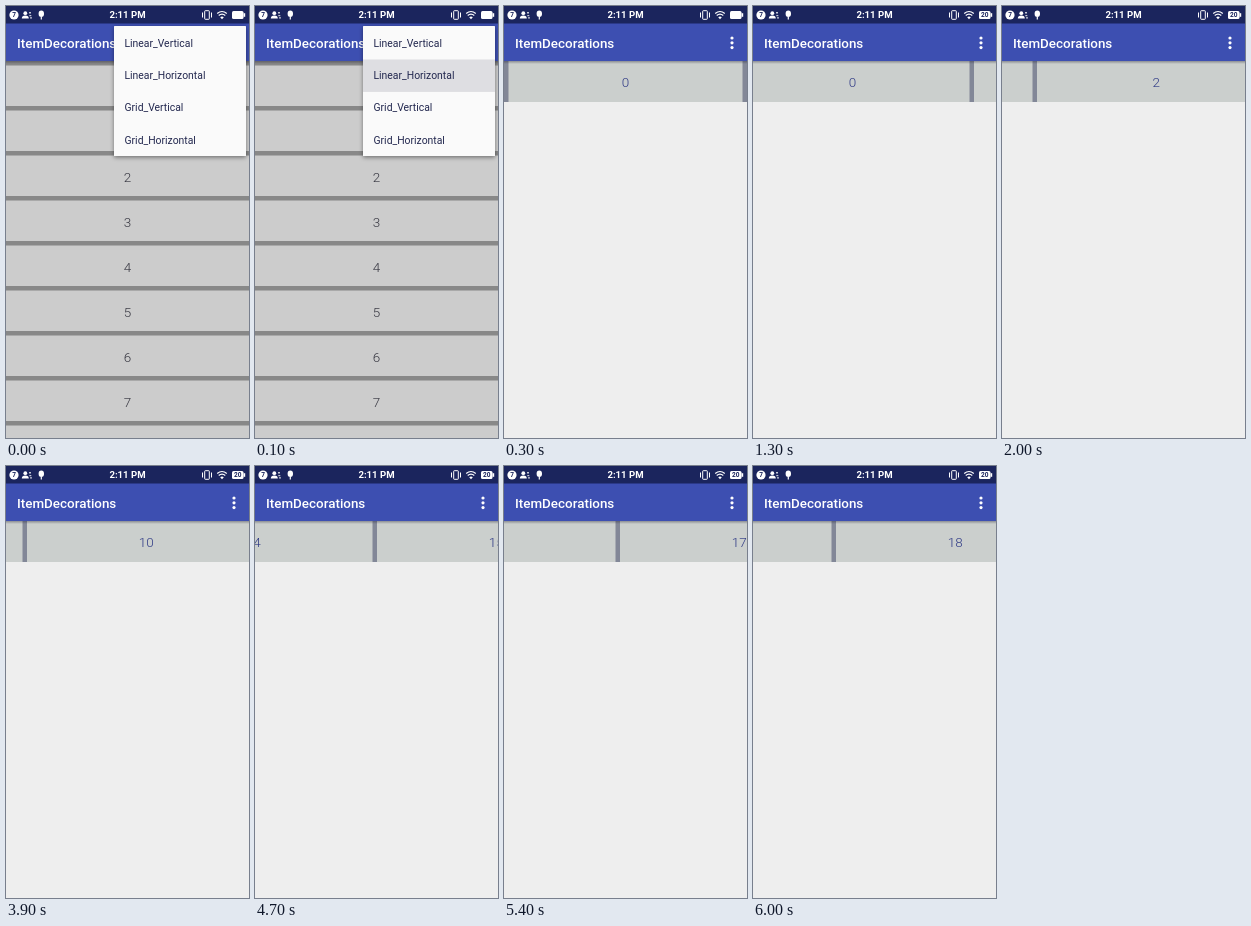
Recreate the animation shown at these times as an HTML page. Size 243 by 432 pixels, loop 6100 ms.

```html
<!DOCTYPE html>
<html lang="en">
<head>
<meta charset="utf-8">
<title>ItemDecorations</title>
<style>
  html, body { margin: 0; width: 100%; height: 100%; overflow: hidden; background: #eee; }
  svg { display: block; width: 243px; height: 432px; font-family: Roboto, sans-serif; }
  .num { font-size: 13.5px; font-weight: 300; text-anchor: middle; }
  .entry { font-size: 10.4px; fill: #23284f; }
  .title { font-size: 13.4px; font-weight: 500; fill: #fff; }
  .clock { font-size: 9.6px; font-weight: 700; fill: #fff; text-anchor: middle; }
  .tiny { font-size: 6.5px; font-weight: 700; fill: #1b255d; text-anchor: middle; }
</style>
</head>
<body>
<svg viewBox="0 0 243 432">
  <defs>
    <linearGradient id="shade" x2="0" y2="1">
      <stop offset="0" stop-color="#223" stop-opacity=".38"/>
      <stop offset="1" stop-color="#223" stop-opacity="0"/>
    </linearGradient>
    <filter id="drop" x="-10%" y="-10%" width="120%" height="125%">
      <feDropShadow dx="0" dy="1.5" stdDeviation="2" flood-opacity=".45"/>
    </filter>
  </defs>
  <rect width="243" height="432" fill="#eee"/>
  <g id="rows"></g>
  <g id="strip"></g>
  <rect y="55" width="243" height="3" fill="url(#shade)"/>

  <rect width="243" height="18" fill="#1b255d"/>
  <rect y="17.5" width="243" height="37.5" fill="#3d4fb1"/>
  <text class="title" x="11" y="42">ItemDecorations</text>
  <g fill="#fff">
    <circle cx="228" cy="32" r="1.6"/>
    <circle cx="228" cy="36.8" r="1.6"/>
    <circle cx="228" cy="41.6" r="1.6"/>
  </g>

  <g fill="#fff">
    <circle cx="8" cy="9" r="4.6"/>
    <circle cx="19.3" cy="7.2" r="1.9"/>
    <path d="M15.8 12.5q0-3 3.5-3t3.5 3z"/>
    <path d="M23 6h2v1.5h-2zM23.3 9h2v1.2h-2zM24 11.3h2v1.2h-2z" opacity=".75"/>
    <ellipse cx="35.3" cy="7.8" rx="2.7" ry="3.3"/>
    <path d="M34.7 11h1.2v2.5h-1.2z"/>
    <rect x="226" y="5" width="11.5" height="8" rx="1.5"/>
    <rect x="237.5" y="7.2" width="1.7" height="3.6"/>
    <path d="M214.2 11.2q1.8-1.5 3.6 0l-1.8 2z"/>
  </g>
  <g fill="none" stroke="#fff">
    <rect x="198.7" y="4.7" width="4.6" height="8.6" rx=".6"/>
    <path d="M196.5 6.5v5M205.5 6.5v5"/>
    <path d="M211.2 7.5q4.8-4 9.6 0M212.7 9.5q3.3-2.7 6.6 0" stroke-width="1.2"/>
  </g>
  <text class="tiny" x="8" y="11.4">7</text>
  <text class="clock" x="121.5" y="12.4">2:11 PM</text>
  <text class="tiny" id="charge" x="231.8" y="11.4">20</text>

  <g id="menu">
    <rect x="108" y="20" width="132" height="130" rx=".5" fill="#fafafa" filter="url(#drop)"/>
    <rect id="press" x="108" y="53.5" width="132" height="32.4" fill="#dedee2"/>
  </g>
</svg>
<script>
const LOOP = 6100, STEP = 100, WIDTH = 243, TOP = 55, GAP = 4.5, ROW = 40.5;
const $ = id => document.getElementById(id);

function add(parent, tag, attrs, text) {
  const el = document.createElementNS('http://www.w3.org/2000/svg', tag);
  for (const key in attrs) el.setAttribute(key, attrs[key]);
  if (text !== undefined) el.textContent = text;
  parent.append(el);
}

const box = (parent, x, y, width, height, fill) =>
  add(parent, 'rect', { x, y, width, height, fill });

const label = (parent, x, y, n, fill) =>
  add(parent, 'text', { class: 'num', x, y, fill }, n);

// Vertical list
box($('rows'), 0, TOP, WIDTH, 432 - TOP, '#888');
for (let i = 0; i < 9; i++) {
  const y = TOP + GAP + i * (ROW + GAP);
  box($('rows'), 0, y, WIDTH, ROW, '#ccc');
  label($('rows'), WIDTH / 2, y + 26, i, '#363640');
}

// Horizontal list; only the first item has a leading gap
box($('strip'), 0, TOP, WIDTH * 20, 41, '#828797');
for (let i = 0; i < 20; i++) {
  const left = i * WIDTH + (i ? 0 : GAP), right = (i + 1) * WIDTH - GAP;
  box($('strip'), left, TOP, right - left, 41, '#cbcfcd');
  label($('strip'), (left + right) / 2, 81, i, '#303b86');
}

['Linear_Vertical', 'Linear_Horizontal', 'Grid_Vertical', 'Grid_Horizontal'].forEach((name, i) =>
  add($('menu'), 'text', { class: 'entry', x: 118.5, y: 40.5 + i * 32.4 }, name));

// Time in ms, scroll offset in px
const knots = [[1200, 0], [2000, 451], [3000, 1412], [3900, 2409], [4700, 3523], [6000, 4291]];

function slope(i) {
  if (i === 0) return 0.15;
  if (i === knots.length - 1) return 0.4;
  const [t0, x0] = knots[i - 1], [t1, x1] = knots[i + 1];
  return (x1 - x0) / (t1 - t0);
}

function scrollAt(t) {
  if (t <= knots[0][0]) return 0;
  let i = 0;
  while (i < knots.length - 2 && t > knots[i + 1][0]) i++;
  const [t0, x0] = knots[i], [t1, x1] = knots[i + 1];
  const d = t1 - t0, u = (t - t0) / d, v = 1 - u;
  return x0 * v * v * (1 + 2 * u) + x1 * u * u * (3 - 2 * u)
    + d * u * v * (slope(i) * v - slope(i + 1) * u);
}

const show = (id, on) => $(id).setAttribute('visibility', on ? 'visible' : 'hidden');

function draw(now) {
  const t = Math.floor((now % LOOP) / STEP) * STEP;
  show('rows', t < 200);
  show('strip', t >= 200);
  show('menu', t < 300);
  $('menu').setAttribute('opacity', t < 200 ? 1 : 0.4);
  $('press').setAttribute('opacity', t < 100 ? 0 : 1);
  show('charge', t >= 800);
  $('strip').setAttribute('transform', `translate(${-Math.round(scrollAt(t))})`);
}

const start = performance.now();
function tick() {
  draw(performance.now() - start);
  requestAnimationFrame(tick);
}
tick();
</script>
</body>
</html>
```
